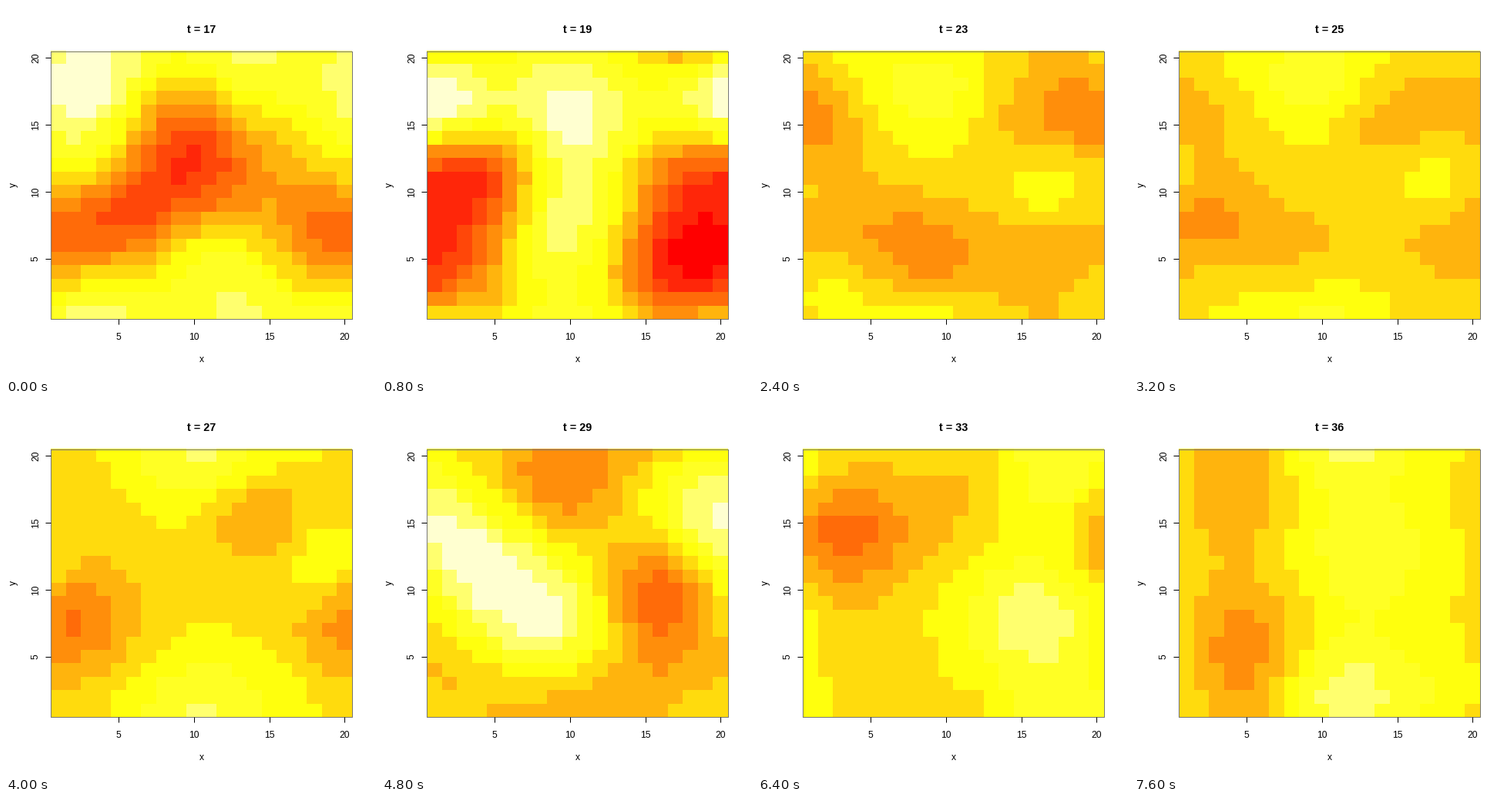
Animation of 480 by 480 pixels, one loop 8 s. Source, as a matplotlib script:

```python
import matplotlib.pyplot as plt
import numpy as np
from matplotlib.animation import FuncAnimation
from matplotlib.colors import ListedColormap

STAGE, DPI = 480, 72
N = 20
FIRST, COUNT, STEP_MS = 17, 20, 400
LEFT, RIGHT, TOP, BOTTOM = 58.44, 449.16, 58.54, 406.06
SPREAD = 3.3

HEAT = ListedColormap([
    "#ff0000", "#ff2609", "#ff4709", "#ff6b09", "#ff8e0b", "#ffb40d",
    "#ffdb0d", "#ffff0d", "#ffff24", "#ffff6e", "#ffffd0"])

plt.rcParams["font.family"] = "Liberation Sans"

cell_x, cell_y = np.meshgrid(np.arange(1, N + 1), np.arange(1, N + 1))
CELLS = np.column_stack([cell_x.ravel(), cell_y.ravel()])


def correlation(a, b):
    """Bell curve of distance on a grid that wraps at its edges."""
    turn = 2 * np.pi / N
    gap = (a[:, None, :] - b[None, :, :]) * turn
    return np.exp((np.cos(gap) - 1).sum(-1) / (SPREAD * turn) ** 2)


def field(base, *points):
    """Smooth surface near base that passes through (x, y, level) points."""
    points = np.array(points)
    sites, rise = points[:, :2], points[:, 2] - base
    weights = np.linalg.solve(correlation(sites, sites), rise)
    return base + (correlation(CELLS, sites) @ weights).reshape(N, N)


# Main peaks and hollows at a few key times
KEYS = {
    17: field(6.2, (3, 18, 10.3), (10.5, 11, 1.7), (9, 14.5, 2.4),
              (5, 8, 2.2), (19.5, 6.5, 3), (10.5, 5.5, 7.2),
              (14, 19.5, 8.6), (3, 12.5, 7.2), (5, 1.5, 8.3)),
    19: field(6.2, (1, 16.7, 10.4), (4, 11, 1.4), (10, 15, 10),
              (10.5, 9.5, 9), (17.6, 4.5, 0), (18.5, 11, 1.7),
              (3, 4, 2.8), (8, 6, 8), (12.5, 1, 6.9)),
    23: field(6.2, (9, 17.5, 8.2), (20, 15.8, 3.7), (15, 15, 5),
              (17.5, 10.5, 6.9), (8.5, 5, 4), (2.5, 8.5, 4.9),
              (2, 2.5, 6.7), (17, 5.5, 4.9)),
    27: field(6.8, (2, 8.5, 3.6), (20, 7, 3.9), (14.5, 15, 4.7),
              (10, 19, 8.4), (13, 2, 8), (18.5, 12, 7), (4, 16, 5.9)),
    29: field(6.8, (3.5, 12, 10.3), (8.5, 8, 10.2), (16.2, 9.7, 2.8),
              (9, 17.5, 3.7), (18.5, 16.5, 9.2), (15, 2, 4.8),
              (3, 3.5, 5.6)),
    33: field(7, (2.7, 14.4, 3), (7.5, 13, 4.8), (5.5, 6, 5.7),
              (15.5, 8, 9.2), (18, 18.5, 8.2), (12, 18.5, 5.7)),
    36: field(6.3, (4, 17.5, 4.7), (3, 9.7, 5.2), (5, 5, 3.9),
              (11, 2.3, 9), (13, 13, 8.3), (19.7, 4, 6.7)),
}


def surface_at(t):
    start = max(k for k in KEYS if k <= t)
    end = min(k for k in KEYS if k >= t)
    mix = (t - start) / max(end - start, 1)
    return (1 - mix) * KEYS[start] + mix * KEYS[end]


fig = plt.figure(figsize=(STAGE / DPI, STAGE / DPI), dpi=DPI,
                 facecolor="white")
ax = fig.add_axes([0, 0, 1, 1])
image = ax.imshow(surface_at(FIRST), cmap=HEAT, vmin=-0.5, vmax=10.5,
                  origin="lower", interpolation="nearest", aspect="auto",
                  extent=(LEFT, RIGHT, BOTTOM, TOP))
ax.set(xlim=(0, STAGE), ylim=(STAGE, 0))
ax.axis("off")


def label(x, y, text, size=12, **style):
    return ax.text(x, y, text, fontsize=size, ha="center", va="baseline",
                   rotation_mode="anchor", **style)


def line(xs, ys, color="black"):
    ax.plot(xs, ys, color=color, lw=1, solid_capstyle="butt")


line([LEFT, RIGHT, RIGHT, LEFT, LEFT],
     [TOP, TOP, BOTTOM, BOTTOM, TOP], "#777777")
for value in range(5, N + 1, 5):
    x = LEFT + (value - 0.5) / N * (RIGHT - LEFT)
    y = BOTTOM - (value - 0.5) / N * (BOTTOM - TOP)
    line([x, x], [BOTTOM, BOTTOM + 7.2])
    line([LEFT, LEFT - 7.2], [y, y])
    label(x, 433, str(value))
    label(42, y, str(value), rotation=90)
middle = (LEFT + RIGHT) / 2
label(middle, 462, "x")
label(13, (TOP + BOTTOM) / 2, "y", rotation=90)
title = label(middle, 35, "", 14.4, weight="bold")


def update(frame):
    t = FIRST + frame
    image.set_data(surface_at(t))
    title.set_text(f"t = {t}")
    return image, title


animation = FuncAnimation(fig, update, frames=COUNT, interval=STEP_MS,
                          repeat=True, repeat_delay=0)
plt.show()
```
